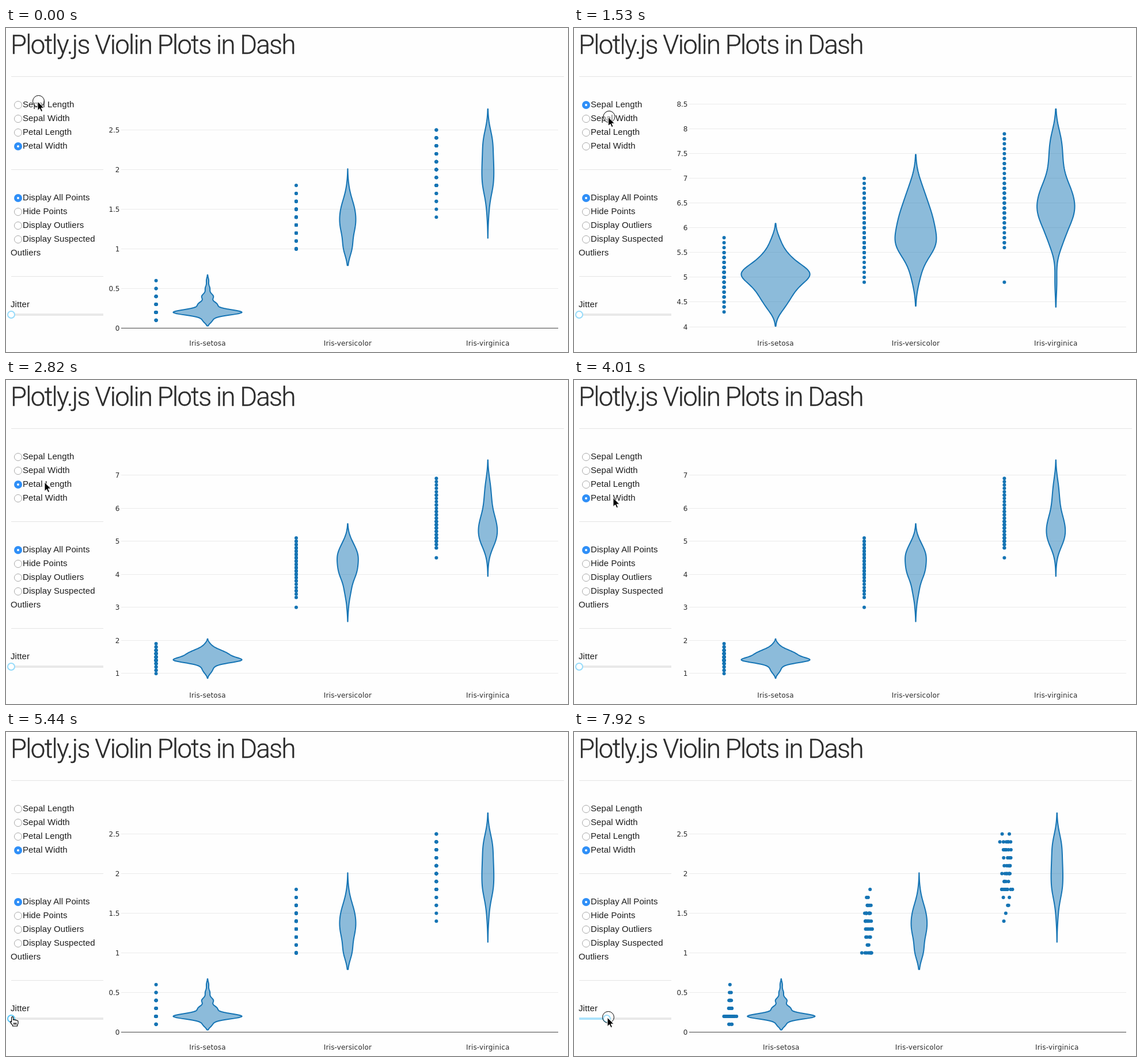
An HTML page for the animation above (8000 ms loop, 976 by 564 pixels).

```html
<!DOCTYPE html>
<html lang="en">
<head>
<meta charset="utf-8">
<title>Violin plots</title>
<style>
  html, body { margin: 0; width: 100%; height: 100%; overflow: hidden; background: #fefefe; }
  svg { display: block; }
  .title { font: 300 45.5px Roboto, "Liberation Sans", sans-serif; letter-spacing: -1.7px; fill: #2c2c2c; stroke: #2c2c2c; stroke-width: .4; }
  .label { font: 15px "Liberation Sans", Arial, sans-serif; letter-spacing: .08px; fill: #1c1c1c; }
  .tick { font: 12px "DejaVu Sans", sans-serif; fill: #2c2c2c; text-anchor: end; }
  .name { font: 12px "DejaVu Sans", sans-serif; letter-spacing: .17px; fill: #2c2c2c; text-anchor: middle; }
  .rule { stroke: #e4e4e4; }
  .grid { stroke: #ebebeb; }
  .zero { stroke: #444; }
  .violin { fill: #1574b4; fill-opacity: .49; stroke: #1574b4; stroke-width: 2; stroke-linejoin: round; }
  .dot { fill: #1574b4; }
</style>
</head>
<body>
<svg id="stage" width="976" height="564" viewBox="0 0 976 564">
  <text class="title" x="8" y="45">Plotly.js Violin Plots in Dash</text>
  <path class="rule" d="M9 84.5H969M9 246.5H169M9 432.5H169"/>
  <g id="form"></g>
  <text class="label" x="8" y="396">Outliers</text>
  <text class="label" x="8" y="486">Jitter</text>
  <g id="plot"></g>
  <path d="M9 499H169" stroke="#e9e9e9" stroke-width="4"/>
  <path id="fill" stroke="#abe2fb" stroke-width="4"/>
  <circle id="knob" cy="499" r="6" fill="#fff" stroke-width="2"/>
  <circle id="ring" r="10" fill="#fff" fill-opacity=".4" stroke="#000"/>
  <path id="arrow" d="M0 0V15.5L3.6 12.2 6 17.6 8.5 16.5 6.2 11.2H11Z" stroke="#fff"/>
  <g id="hand" fill="#fff" stroke="#000" stroke-width="1.2" stroke-linejoin="round">
    <path d="M-2.4 11V3.2Q-2.2 1.6-.9 1.6T.6 3.2V7.2Q2.2 6 3.3 7.4 5 6.6 6 8.1 8.6 7.6 9 10V13Q8.6 15 7.6 16V18H-.4V16.4Q-2.6 14.4-4.2 11.6-5 9.8-3.8 9.5-3 9.5-2.4 11Z"/>
    <path d="M1.6 12V15.5M3.6 12V15.5M5.6 12V15.5"/>
  </g>
</svg>
<script>
const LOOP = 8000, DRAG = 5920, PLOT_LAG = 350;
const $ = id => document.getElementById(id);

// Linear path through key points [position, ...values].
function path(keys, p) {
  const i = Math.max(1, keys.findIndex(k => k[0] >= p));
  const a = keys[i - 1], b = keys[i];
  const f = Math.min(1, (p - a[0]) / (b[0] - a[0]));
  return a.slice(1).map((v, j) => v + (b[j + 1] - v) * f);
}

// A sample of 50 flowers, given in tenths at these ranks.
const SIZE = 50;
const ranks = [0, 1, 6, 12, 21, 30, 37, 46, 49];

function violin(quantiles) {
  const keys = ranks.map((r, i) => [r, quantiles[i]]);
  const pts = Array.from({ length: SIZE }, (_, i) => Math.round(path(keys, i)[0]) / 10);
  const lo = pts[0], hi = pts[SIZE - 1], iqr = pts[37] - pts[12];
  const mean = pts.reduce((a, b) => a + b) / SIZE;
  const sd = Math.sqrt(pts.reduce((a, v) => a + (v - mean) ** 2, 0) / (SIZE - 1));
  const band = 1.059 * Math.min(sd, iqr / 1.349) * SIZE ** -0.2;
  const start = lo - 2 * band, span = hi - lo + 4 * band;
  const steps = Math.ceil(span / band * 5);
  const curve = Array.from({ length: steps + 1 }, (_, i) => {
    const v = start + span * i / steps;
    const sum = pts.reduce((a, p) => a + Math.exp(-0.5 * ((v - p) / band) ** 2), 0);
    return [v, sum / band];
  });
  // Crowded points spread wider than sparse ones.
  const spread = Math.max((hi - lo) / 10, iqr);
  const crowd = pts.map((_, i) => {
    const a = Math.max(0, i - 5), b = Math.min(SIZE - 1, i + 5);
    return Math.min(1, Math.sqrt(spread * 0.01 * (b - a) / (pts[b] - pts[a] + spread * 1e-9)));
  });
  const most = Math.max(...crowd);
  return { pts, curve, crowd: crowd.map(c => c / most) };
}

function view(base, baseY, scale, to, step, ...samples) {
  const violins = samples.map(violin);
  const peak = Math.max(...violins.flatMap(v => v.curve.map(c => c[1])));
  return { violins, peak, from: base, to, step, y: v => baseY - (v - base) * scale };
}
const species = ["Iris-setosa", "Iris-versicolor", "Iris-virginica"];
const views = [
  view(4, 520, 86.07, 8.5, 0.5,
    [43, 44, 46, 48, 50, 51, 52, 55, 58],
    [49, 50, 55, 56, 58, 61, 63, 67, 70],
    [49, 56, 59, 62, 64, 67, 69, 77, 79]),
  view(2, 482, 123, 4.5, 0.5,
    [23, 29, 30, 31, 34, 35, 37, 40, 44],
    [20, 22, 24, 25, 28, 29, 30, 32, 34],
    [22, 25, 26, 28, 30, 30, 32, 34, 38]),
  view(1, 510.9, 57.55, 7, 1,
    [10, 11, 13, 14, 14, 15, 16, 17, 19],
    [30, 33, 37, 40, 42, 45, 46, 49, 51],
    [45, 48, 50, 51, 54, 56, 59, 66, 69]),
  view(0, 522.5, 138, 2.5, 0.5,
    [1, 1, 2, 2, 2, 2, 3, 4, 6],
    [10, 10, 10, 12, 13, 14, 15, 16, 18],
    [14, 15, 18, 18, 20, 21, 23, 24, 25])
];

function random() {
  let seed = 2000000000;
  return function next() {
    const last = seed;
    seed = (69069 * seed + 1) % 4294967296;
    return Math.abs(seed - last) < 429496729 ? next() : seed / 4294967296;
  };
}

function drawPlot(index, jitter) {
  const { violins, peak, from, to, step, y } = views[index];
  const left = 0.6165 + 0.255 * jitter;
  const gap = 759 / (left + 2.502);
  const half = gap * 0.245;
  const rand = random();
  let out = "";
  for (let v = from; v <= to + 0.01; v += step) {
    const gy = Math.floor(y(v) + 0.01) + 0.5;
    out += `<path class="${v ? "grid" : "zero"}" d="M200 ${gy}H959"/>` +
      `<text class="tick" x="197.5" y="${gy + 4}">${+v.toFixed(1)}</text>`;
  }
  violins.forEach(({ pts, curve, crowd }, i) => {
    const x = 200 + gap * (left + i);
    const side = sign => curve.map(([v, d]) =>
      `${(x + sign * half * d / peak).toFixed(2)} ${y(v).toFixed(2)}`);
    out += `<path class="violin" d="M${side(-1).concat(side(1).reverse()).join("L")}Z"/>`;
    pts.forEach((v, k) => {
      const shift = 2 * jitter * crowd[k] * (rand() - 0.5);
      out += `<circle class="dot" cx="${x + half * (shift - 1.5)}" cy="${y(v)}" r="3"/>`;
    });
    out += `<text class="name" x="${x}" y="553">${species[i]}</text>`;
  });
  $("plot").innerHTML = out;
}

const options = ["Sepal Length", "Sepal Width", "Petal Length", "Petal Width",
  "Display All Points", "Hide Points", "Display Outliers", "Display Suspected"];

function drawForm(chosen) {
  $("form").innerHTML = options.map((text, i) => {
    const y = (i < 4 ? 134 : 200) + 24 * i;
    const mark = i === chosen || i === 4
      ? `<circle cx="21" cy="${y}" r="7" fill="#2f8ff7"/><circle cx="21" cy="${y}" r="2" fill="#fff"/>`
      : `<circle cx="21" cy="${y}" r="6.5" fill="#fff" stroke="#a8a8a8"/>`;
    return mark + `<text class="label" x="29" y="${y + 4}">${text}</text>`;
  }).join("");
}

function drawSlider(amount, hot) {
  const x = 9 + 160 * amount;
  $("fill").setAttribute("d", `M9 499H${x}`);
  $("knob").setAttribute("cx", x);
  $("knob").setAttribute("stroke", hot ? "#57c5f7" : "#96dbfa");
}

function drawPointer(x, y, shape, ring) {
  for (const id of ["arrow", "hand"]) {
    $(id).setAttribute("visibility", id === shape ? "visible" : "hidden");
    $(id).setAttribute("transform", `translate(${x} ${y})`);
  }
  $("ring").setAttribute("visibility", ring ? "visible" : "hidden");
  $("ring").setAttribute("cx", x + 1.5);
  $("ring").setAttribute("cy", y - 0.5);
}

// Each click picks the next option; the plot may follow a little later.
const clicks = [
  { press: 0, release: 350, redraw: 470 },
  { press: 1300, release: 1540, redraw: 1640 },
  { press: 2700, release: 2820, redraw: 2820 },
  { press: 3780, release: 4010, redraw: 4130 }
];
const pointer = [
  [0, 55, 128], [710, 55, 128], [1180, 59.5, 155], [1760, 59.5, 155],
  [2340, 69, 188], [2580, 67, 178], [2940, 67, 178], [3300, 68, 205],
  [4370, 68, 205], [4850, 8, 389], [5200, 10, 496], [5440, 12, 494],
  [6290, 12, 494], [6400, 19, 494], [7200, 33, 495.5], [7920, 58, 497], [LOOP, 58, 497]
];
const picked = (t, stage) => (clicks.filter(c => t >= c[stage]).length + 3) % 4;
const jitterAt = t => t < DRAG ? 0 : Math.round((path(pointer, t)[0] - 9) / 16) / 10;

function shapeAt(t) {
  if (t >= 4970 && t < 5200) return "none";
  return t >= 5200 && t < 6400 ? "hand" : "arrow";
}

const drawn = new Map();
function update(draw, ...args) {
  const state = args.join();
  if (drawn.get(draw) !== state) draw(...args);
  drawn.set(draw, state);
}

function render(t) {
  const ring = t >= DRAG || clicks.some(c => t >= c.press && t < c.release);
  update(drawForm, picked(t, "release"));
  update(drawPlot, picked(t, "redraw"), jitterAt(t - PLOT_LAG));
  update(drawSlider, jitterAt(t), t >= 5200);
  update(drawPointer, ...path(pointer, t), shapeAt(t), ring);
}

const begin = performance.now();
function tick() {
  render((performance.now() - begin) % LOOP);
  requestAnimationFrame(tick);
}
tick();
</script>
</body>
</html>
```
